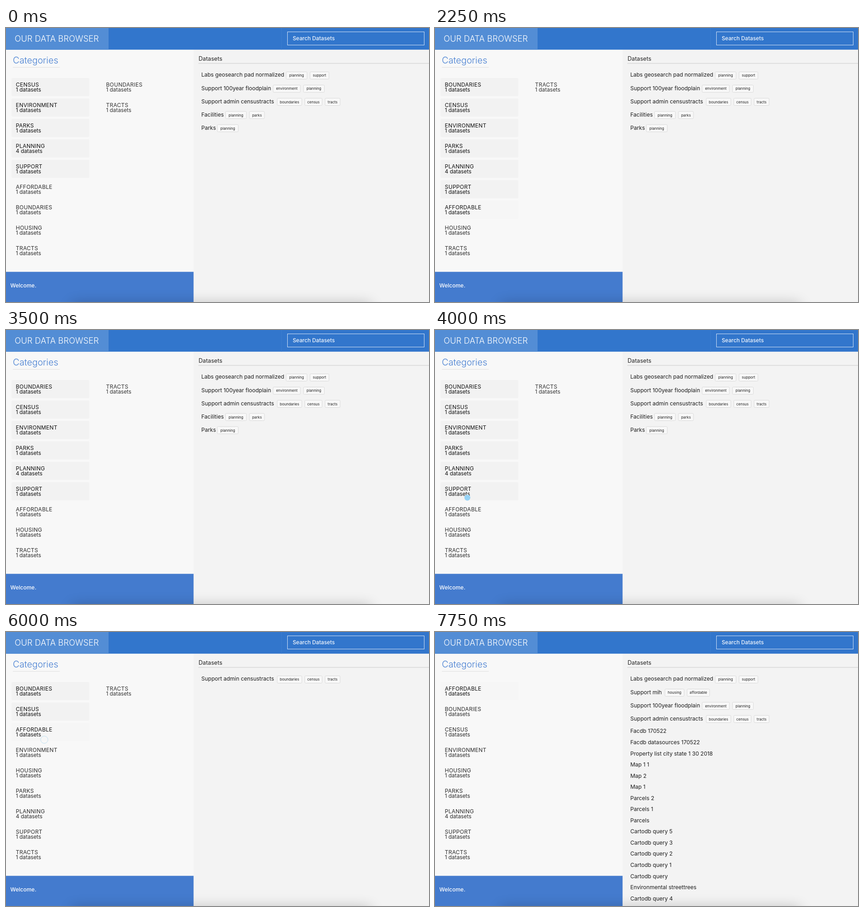
These frames come from a looping animation (928 px wide and 603 px high, 8 s). An HTML page with a canvas:

```html
<!DOCTYPE html>
<html lang="en">
<head>
<meta charset="utf-8">
<title>Data browser</title>
<style>
  html, body { margin: 0; width: 100%; height: 100%; overflow: hidden; background: #f3f3f3; }
  canvas { display: block; width: 928px; height: 603px; }
</style>
</head>
<body>
<canvas id="stage" width="928" height="603"></canvas>
<script>
const ctx = document.getElementById('stage').getContext('2d');
const LOOP = 8000, STEP = 250;

const categories = ['affordable', 'boundaries', 'census', 'environment', 'housing',
  'parks', 'planning', 'support', 'tracts'];
const initial = ['census', 'environment', 'parks', 'planning', 'support'];

const tagWidth = { planning: 47, support: 42.5, environment: 61, boundaries: 55, census: 39,
  tracts: 34, parks: 34, housing: 43, affordable: 50.5 };

const plain = ['Facdb 170522', 'Facdb datasources 170522', 'Property list city state 1 30 2018',
  'Map 1 1', 'Map 2', 'Map 1', 'Parcels 2', 'Parcels 1', 'Parcels',
  'Cartodb query 5', 'Cartodb query 3', 'Cartodb query 2', 'Cartodb query 1', 'Cartodb query',
  'Environmental streettrees', 'Cartodb query 4'];

const datasets = [
  { name: 'Labs geosearch pad normalized', tags: ['planning', 'support'], tagX: 614 },
  { name: 'Support mih', tags: ['housing', 'affordable'], tagX: 504 },
  { name: 'Support 100year floodplain', tags: ['environment', 'planning'], tagX: 585.5 },
  { name: 'Support admin censustracts', tags: ['boundaries', 'census', 'tracts'], tagX: 594.5 },
  ...plain.map(name => ({ name, tags: [] })),
  { name: 'Facilities', tags: ['planning', 'parks'], tagX: 481 },
  { name: 'Parks', tags: ['planning'], tagX: 463 }
];

// Each click toggles a category; row is the line under the pointer.
const clicks = [
  { at: 2000, tag: 'boundaries', x: 78, y: 390, row: 6 },
  { at: 4250, tag: 'support', x: 71, y: 369, row: 5 },
  { at: 4750, tag: 'planning', x: 73, y: 336, row: 4 },
  { at: 5500, tag: 'parks', x: 76, y: 282, row: 3 },
  { at: 6000, tag: 'environment', x: 84, y: 237, row: 2 },
  { at: 6750, tag: 'census', x: 94, y: 193, row: 1 },
  { at: 7500, tag: 'boundaries', x: 92, y: 146, row: 0 }
];

function text(str, x, y, size, color, { weight = 400, spacing = 0, align = 'left' } = {}) {
  ctx.font = `${weight} ${size}px Inter, sans-serif`;
  ctx.letterSpacing = spacing + 'px';
  ctx.textAlign = align;
  ctx.fillStyle = color;
  ctx.fillText(str, x, y);
}

function rect(x, y, w, h, color) {
  ctx.fillStyle = color;
  ctx.fillRect(x, y, w, h);
}

function roundRect(x, y, w, h, r, fill, stroke) {
  ctx.beginPath();
  ctx.roundRect(x, y, w, h, r);
  ctx.fillStyle = fill;
  ctx.fill();
  if (stroke) {
    ctx.strokeStyle = stroke;
    ctx.lineWidth = 1;
    ctx.stroke();
  }
}

const countOf = (tag, list) => list.filter(d => d.tags.includes(tag)).length;

function selectionAt(t) {
  const chosen = new Set(initial);
  for (const { at, tag } of clicks) {
    if (at > t) break;
    if (!chosen.delete(tag)) chosen.add(tag);
  }
  return chosen;
}

function drawFrame() {
  rect(0, 0, 928, 603, '#f3f3f3');
  rect(0, 0, 411.5, 603, '#f8f8f8');
  rect(0, 536.6, 411.5, 67, '#447bce');
  rect(0, 0, 928, 47.7, '#3276cc');
  rect(0, 0, 225, 47.7, '#538dd5');
  rect(604, 0, 1, 47.7, '#3b7ccf');
  ctx.strokeStyle = '#d3e2f5';
  ctx.lineWidth = 1;
  ctx.strokeRect(617.5, 8.5, 300, 29);
  text('OUR DATA BROWSER', 19, 29.5, 18.2, '#fff', { weight: 300, spacing: 0.1 });
  text('Search Datasets', 629, 27, 11.8, '#f2f7fd', { weight: 500 });
  text('Categories', 15, 78, 19.8, '#467fd2', { weight: 300 });
  rect(15, 86, 103, 1, '#dedede');
  text('Datasets', 422.5, 72, 12.6, '#222');
  rect(422, 77.4, 506, 1, '#cbcbcb');
  text('Welcome.', 9.5, 571, 12, '#fff', { weight: 500 });
}

function drawCategory(tag, count, x, row, color) {
  const y = 128.5 + row * 45;
  text(tag.toUpperCase(), x, y, 12, color, { spacing: 0.25 });
  text(count + ' datasets', x, y + 11.5, 11.8, color);
}

function drawCategories(t, chosen, shown) {
  const isOn = tag => chosen.has(tag);
  const isOff = tag => !chosen.has(tag);
  const ordered = [...categories.filter(isOn), ...categories.filter(isOff)];
  const hover = clicks.find(c => t >= c.at && t < c.at + 500);
  ordered.forEach((tag, row) => {
    const on = isOn(tag), hovered = hover && hover.row === row;
    if (on || hovered) {
      roundRect(12, 110 + row * 45, 171, 40, 3, on ? '#f2f2f2' : '#f6f6f6');
    }
    drawCategory(tag, countOf(tag, datasets), 21.5, row, on || hovered ? '#111' : '#2b2b2b');
  });
  if (!chosen.size) return;
  categories.filter(tag => isOff(tag) && countOf(tag, shown))
    .forEach((tag, row) => drawCategory(tag, countOf(tag, shown), 219.5, row, '#333'));
}

function drawDatasets(shown) {
  let top = 90;
  for (const { name, tags, tagX } of shown) {
    if (top > 603) break;
    text(name, 428.5, top + (tags.length ? 17.4 : 16), 12, '#1c1c1c');
    let x = tagX;
    for (const tag of tags) {
      const w = tagWidth[tag];
      roundRect(x + 0.5, Math.round(top) + 6.5, w - 1, 16, 2, '#f8f8f8', '#dadada');
      text(tag, x + w / 2, top + 17.3, 8, '#222', { align: 'center' });
      x += w + 5.5;
    }
    top += tags.length ? 29.1 : 24.55;
  }
}

function drawShadow() {
  ctx.save();
  ctx.shadowColor = 'rgba(0, 0, 0, 0.24)';
  ctx.shadowBlur = 30;
  ctx.fillStyle = '#000';
  ctx.fillRect(145, 607, 655, 60);
  ctx.restore();
}

function drawStatus() {
  ctx.beginPath();
  ctx.roundRect(-4, 591, 277, 16, [0, 3, 0, 0]);
  ctx.fillStyle = '#c6d2e8';
  ctx.fill();
  text('yc/datasets/59514baf-c6bc-4894-9c74-bd88a7a58b0b', 0, 601, 9, '#222');
}

function drawPointer(t) {
  for (const { at, x, y } of clicks) {
    const pressed = t === at - STEP;
    if (!pressed && t !== at) continue;
    ctx.beginPath();
    ctx.arc(x, y, pressed ? 6.5 : 8, 0, Math.PI * 2);
    if (pressed) {
      ctx.fillStyle = '#96d3f6';
      ctx.fill();
    } else {
      ctx.strokeStyle = '#cfe6f2';
      ctx.lineWidth = 1.3;
      ctx.stroke();
    }
  }
}

function draw(t) {
  const chosen = selectionAt(t);
  const shown = chosen.size ? datasets.filter(d => d.tags.some(tag => chosen.has(tag))) : datasets;
  const hovering = t >= 2750 && t < 3500;
  drawFrame();
  if (hovering) roundRect(423, 90, 510, 28, 3, '#eaeaea');
  drawCategories(t, chosen, shown);
  drawDatasets(shown);
  drawShadow();
  if (hovering) drawStatus();
  drawPointer(t);
}

let start;
function tick(now) {
  start ??= now;
  draw(Math.floor((now - start) % LOOP / STEP) * STEP);
  requestAnimationFrame(tick);
}
draw(0);
requestAnimationFrame(tick);
</script>
</body>
</html>
```
